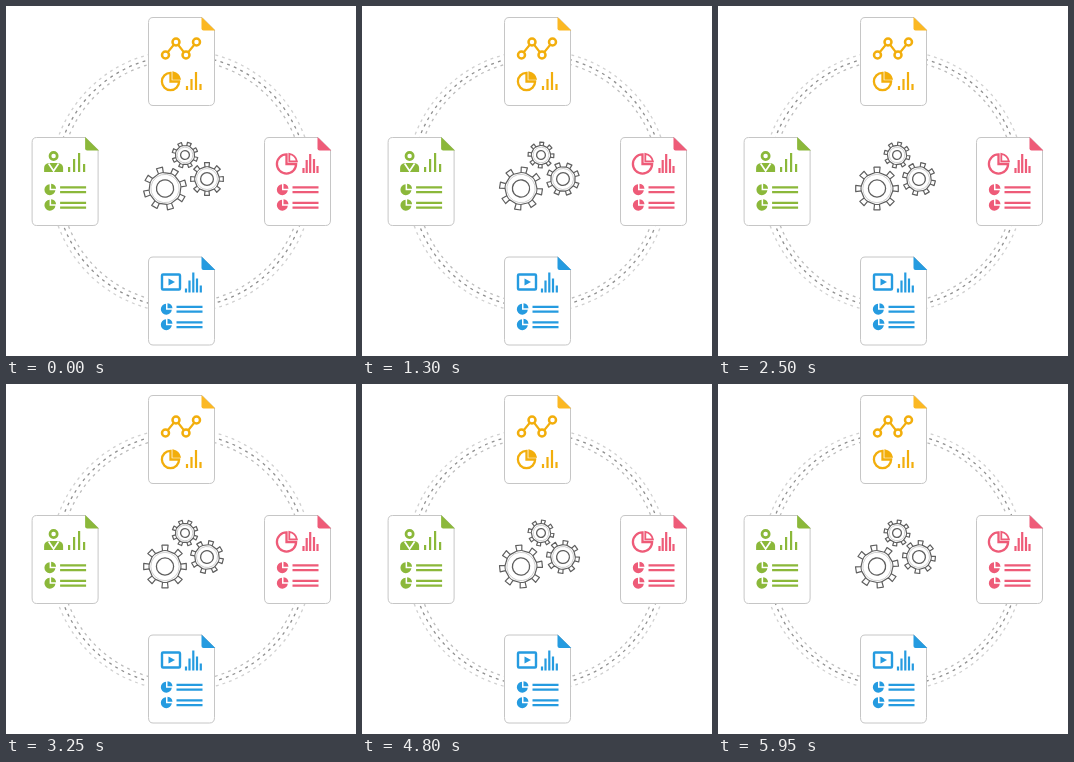
Write an HTML page that moves like this. It is 350 px wide and 350 px high and loops after 6000 ms.

```html
<!DOCTYPE html>
<html lang="en">
<head>
<meta charset="utf-8">
<title>Reports and gears</title>
<style>
  html, body { margin: 0; width: 100%; height: 100%; overflow: hidden; background: #fff; }
  svg { display: block; width: 100vw; height: 100vh; }
</style>
</head>
<body>
<svg id="stage" viewBox="0 0 350 350" fill="none"></svg>
<script>
const LOOP = 6000, STEP = 50;
const YELLOW = '#f2ae0c', GREEN = '#8bb83a', RED = '#ee5b78', BLUE = '#259be0';

const path = (d, attrs) => `<path d="${d}" ${attrs}/>`;
const circle = (x, y, r, attrs) => `<circle cx="${x}" cy="${y}" r="${r}" ${attrs}/>`;
const polar = (r, a) => `${(r * Math.cos(a)).toFixed(2)} ${(r * Math.sin(a)).toFixed(2)}`;

// Dashed circle; pathLength makes every dash period one unit long.
const ring = (id, r, count, dash, color) =>
  `<g id="${id}">` + circle(0, 0, r, `pathLength="${count}" stroke="${color}" stroke-width="1.3"
    stroke-dasharray="${dash} ${1 - dash}"`) + '</g>';

function gear(id, outer, body, hole, half) {
  const teeth = 8, points = [];
  let edge = '';
  for (let i = 0; i < teeth; i++) {
    const mid = i * 2 * Math.PI / teeth - Math.PI / 2;
    const foot = half * 0.8 / body, tip = half / outer;
    const tooth = [polar(body, mid - foot), polar(outer, mid - tip),
      polar(outer, mid + tip), polar(body, mid + foot)];
    points.push(...tooth);
    edge += `M${tooth[0]}A${body} ${body} 0 0 1 ${tooth[3]}`;
  }
  return `<g id="${id}" stroke="#5f5f5f" stroke-linejoin="round">`
    + path('M' + points.join('L') + 'Z', 'fill="#fff" stroke-width="1.2"')
    + path(edge, 'stroke-width="1"')
    + circle(0, 0, body - 1.8, 'stroke="#c0c0c0" stroke-width=".7"')
    + circle(0, 0, hole, 'stroke-width="1.3"') + '</g>';
}

const card = (x, y, color, content) => `<g transform="translate(${x} ${y})">`
  + path('M5 .5H54L66.5 13V83Q66.5 88.5 61.5 88.5H5Q.5 88.5 .5 83V5.5Q.5 .5 5 .5Z',
    'fill="#fff" stroke="#c6c6c6"')
  + path('M53.5 0L67.3 13.4H55.5Q53.5 13.4 53.5 11.4Z', `fill="${color}"`)
  + content + '</g>';

const bars = (base, list, color) => path(
  list.map(([x, h]) => `M${x} ${base}v${-h}`).join(''), `stroke="${color}" stroke-width="2.2"`);

const bigPie = (x, y, r, color, wedge) => `<g transform="translate(${x} ${y})">`
  + path(`M0 ${-r}A${r} ${r} 0 1 0 ${r} 0H0Z`, `stroke="${color}" stroke-width="2.3"`)
  + path(`M2.8 ${-r - 0.6}A${r} ${r} 0 0 1 ${r + 0.8} -2.6H2.8Z`,
    `fill="${wedge}" stroke="${color}" stroke-width="1.8"`) + '</g>';

const row = (y, color) => `<g transform="translate(18.5 ${y})">`
  + path('M-.5 -5.3A5.5 5.5 0 1 0 5.3 .7H-.5Z', `fill="${color}"`)
  + path('M1 -5.8A5.5 5.5 0 0 1 6 -.8H1Z', `fill="${color}"`)
  + path('M10 -2.1h26M10 2.6h26', `stroke="${color}" stroke-width="2.2"`) + '</g>';

const rows = color => row(52.5, color) + row(68, color);

const nodes = [[17.5, 38], [28, 25], [38, 38], [48.5, 25]];
const lineChart = path('M' + nodes.join('L'), `stroke="${YELLOW}" stroke-width="2.1"`)
  + nodes.map(([x, y]) => circle(x, y, 3.5, `fill="#fff" stroke="${YELLOW}" stroke-width="2.5"`)).join('');

const person = circle(22, 19, 3.6, `stroke="${GREEN}" stroke-width="2.7"`)
  + path('M12.5 35V31Q12.5 27 17 26H27Q31.5 27 31.5 31V35Z', `fill="${GREEN}"`)
  + path('M17 26.5L22 34L27 26.5', 'stroke="#fff" stroke-width="1.7"');

const video = `<rect x="14" y="18" width="18" height="15" rx="1" stroke="${BLUE}" stroke-width="2.4"/>`
  + path('M20.5 22L27 25.5L20.5 29Z', `fill="${BLUE}"`);

document.getElementById('stage').innerHTML =
  '<rect width="350" height="350" fill="#fff"/>'
  + ring('outer', 131, 120, 0.42, '#d0d0d0')
  + ring('middle', 126, 110, 0.4, '#909090')
  + ring('inner', 121.5, 110, 0.4, '#bcbcbc')
  + gear('large', 21.5, 16, 8.6, 3.1)
  + gear('medium', 16.5, 12.3, 6.4, 2.5)
  + gear('small', 13, 9.6, 4.4, 2)
  + card(142, 11, '#fbb823', lineChart + bigPie(22.5, 64.5, 8.6, YELLOW, YELLOW)
    + bars(73, [[39, 4], [43.5, 11], [48, 18], [52.5, 6]], YELLOW))
  + card(25.6, 131, GREEN, person + rows(GREEN)
    + bars(35, [[37.5, 5], [42.5, 13], [47.5, 19], [52.5, 8]], GREEN))
  + card(258, 131, RED, bigPie(22.5, 27, 9.6, RED, '#fff') + rows(RED)
    + bars(36, [[39.5, 5], [42.7, 13], [46.2, 19], [50, 14], [53.5, 7]], RED))
  + card(142, 250.5, BLUE, video + rows(BLUE)
    + bars(36, [[38, 4], [41.5, 12], [45.3, 20], [49, 14], [52.8, 7]], BLUE));

// Centre, starting angle and turns per loop of each rotating part.
const parts = [
  ['outer', 175.5, 175.5, 0, -0.5],
  ['middle', 175.5, 175.5, 0, 0.5],
  ['inner', 175.5, 175.5, 0, -0.5],
  ['large', 159, 182.5, -15, -2],
  ['medium', 201, 173, 0, -2],
  ['small', 179, 149, 20, 3.25]
].map(([id, ...rest]) => [document.getElementById(id), ...rest]);

function draw(now) {
  const t = Math.floor(now % LOOP / STEP) * STEP / LOOP;
  for (const [node, x, y, start, turns] of parts)
    node.setAttribute('transform', `translate(${x} ${y}) rotate(${start + 360 * turns * t})`);
  requestAnimationFrame(draw);
}
draw(performance.now());
</script>
</body>
</html>
```
